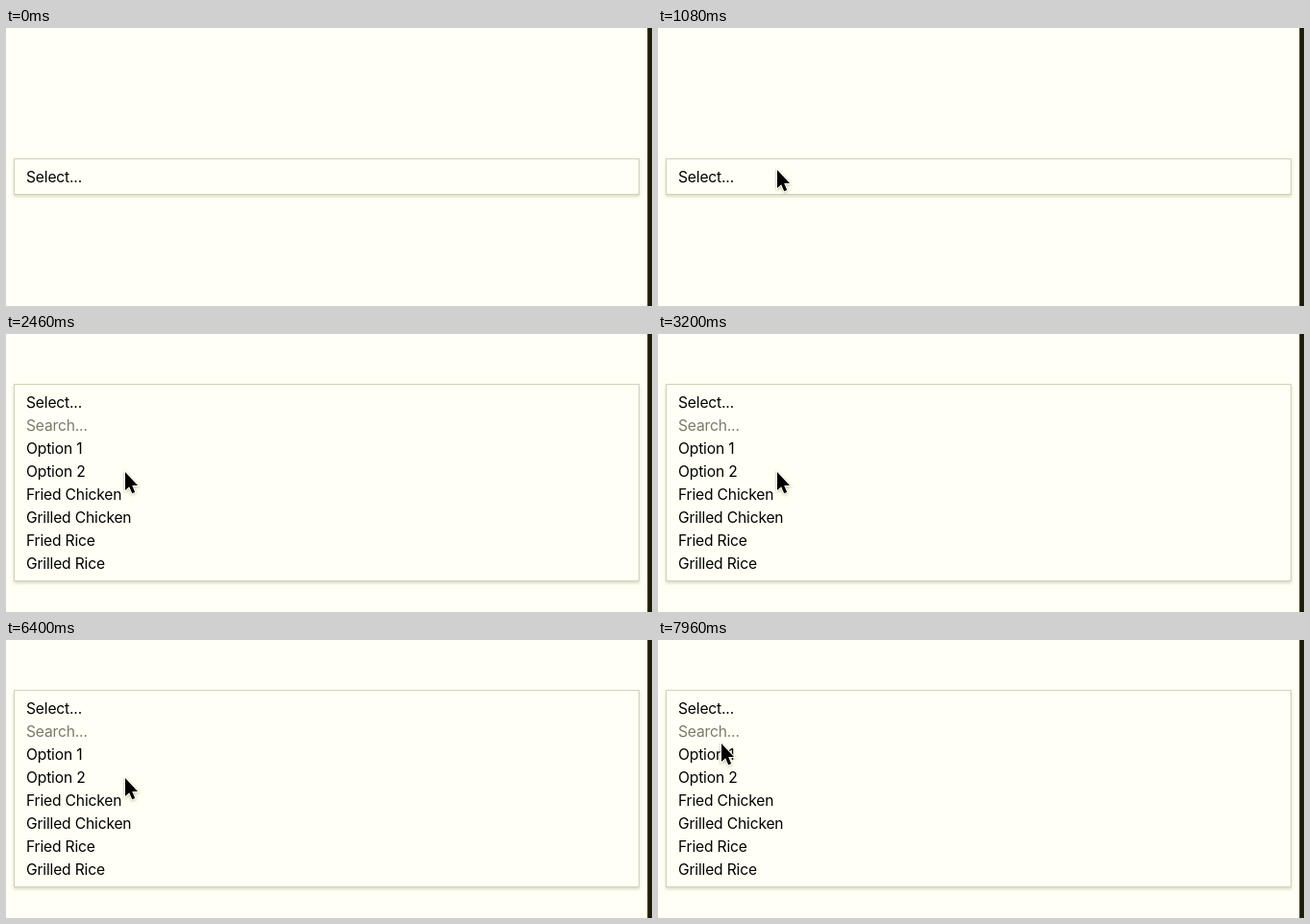
Write an HTML page that moves like this. It is 672 px wide and 290 px high and loops after 8 s.

```html
<!DOCTYPE html>
<html lang="en">
<head>
<meta charset="utf-8">
<title>Select menu</title>
<style>
html, body { margin: 0; width: 100%; height: 100%; overflow: hidden; background: #fffff5; }
#edge { position: absolute; left: 667px; top: 0; width: 5px; height: 290px; background: linear-gradient(90deg, #77775c, #1c1c08 30%); }
#box {
  position: absolute; left: 8px; top: 136px; width: 651px; height: 38px; box-sizing: border-box;
  padding: 7px 12px 0; border: 1px solid #d2d2bc; background: #fffff5;
  box-shadow: 0 2px 3px rgba(90, 90, 20, .22);
  font: 15.6px/24px Inter, "Liberation Sans", sans-serif; letter-spacing: -.16px; color: #000; white-space: nowrap;
}
#box.open { top: 52px; height: 206px; }
#box:not(.open) div + div { display: none; }
.hint { color: #7a7a6c; }
#cursor { position: absolute; left: 0; top: 0; overflow: visible; filter: drop-shadow(0 1px 1.5px rgba(80, 80, 0, .35)); }
</style>
</head>
<body>
<div id="edge"></div>
<div id="box">
  <div>Select...</div>
  <div class="hint">Search...</div>
  <div>Option 1</div>
  <div>Option 2</div>
  <div>Fried Chicken</div>
  <div>Grilled Chicken</div>
  <div>Fried Rice</div>
  <div>Grilled Rice</div>
</div>
<svg id="cursor" width="16" height="26">
  <path d="M0 0V19L4.2 15.2L7.2 22.2L10.2 20.9L7.2 14H13Z" fill="#000" stroke="#fffff5" stroke-width="2" paint-order="stroke"/>
</svg>
<script>
const LOOP = 8000, OPEN_AT = 2040;
const box = document.getElementById("box");
const cursor = document.getElementById("cursor");

const clamp = k => Math.min(1, Math.max(0, k));
const easeOut = k => 1 - (1 - k) ** 2;

// Each move glides the pointer on from wherever the last one left it.
const start = { x: 310, y: 327 };
const moves = [
  { from: 160, to: 1080, x: 124, y: 148 },
  { from: 1340, to: 1480, x: 124, y: 144 },
  { from: 7080, to: 7820, x: 35, y: 198 },
  { from: 7900, to: 7960, x: 66, y: 108 }
];

function tip(t) {
  return moves.reduce((p, m) => {
    const k = easeOut(clamp((t - m.from) / (m.to - m.from)));
    return { x: p.x + (m.x - p.x) * k, y: p.y + (m.y - p.y) * k };
  }, start);
}

function draw(now) {
  const t = now % LOOP;
  const { x, y } = tip(t);
  box.classList.toggle("open", t >= OPEN_AT);
  cursor.style.transform = `translate(${x}px, ${y}px)`;
  requestAnimationFrame(draw);
}
draw(0);
</script>
</body>
</html>
```
